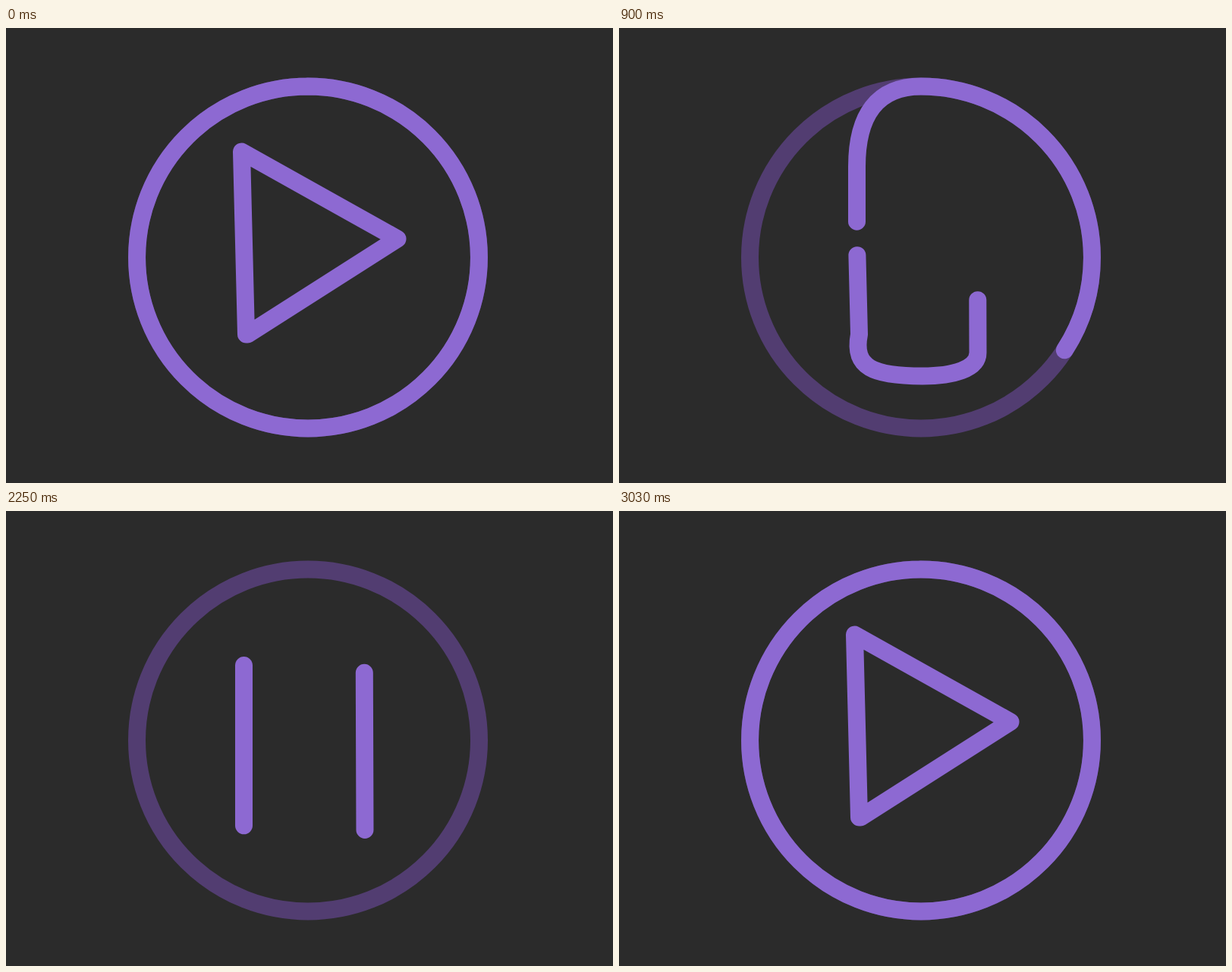
Write an HTML page that moves like this. It is 800 px wide and 600 px high and loops after 3390 ms.

```html
<!DOCTYPE html>
<html lang="en">
<head>
<meta charset="utf-8">
<title>Play / pause</title>
<style>
  html, body { margin: 0; width: 100%; height: 100%; overflow: hidden; background: #2b2b2b; }
  svg { display: block; width: 800px; height: 600px; }
  svg * { fill: none; stroke-width: 23; stroke-linecap: round; stroke-linejoin: round; }
  circle { stroke: #523d71; }
  path { stroke: #8d69d2; }
</style>
</head>
<body>
<svg viewBox="0 0 800 600">
  <circle cx="398" cy="302.5" r="225.5"/>
  <path id="ring"/>
  <path id="triangle"/>
</svg>
<script>
const LOOP = 3390, STEP = 30, TO_PAUSE = 442, TO_PLAY = 2212;

// Each stroke slides from its play outline along a tail and ends as a pause bar.
function makeStroke(id, outline, tail, bar, duration) {
  const path = document.getElementById(id);
  path.setAttribute('d', outline);
  const closed = path.getTotalLength();
  path.setAttribute('d', outline + tail);
  return { path, closed, total: path.getTotalLength(), bar, duration };
}

const strokes = [
  makeStroke('ring',
    'M398 77a225.5 225.5 0 0 0 0 451a225.5 225.5 0 0 0 0-451',
    'C340 77 313.5 115 313.5 183V416', 205, 828),
  makeStroke('triangle',
    'M318.5 404L516 278L310.5 163L316.5 404',
    'C308 448 335 459 400 459C440 459 473 450 473 428L472.3 211', 204, 766)
];

function ease(u) {
  u = Math.min(1, Math.max(0, u));
  return (1 - Math.cos(Math.PI * u)) / 2;
}

function draw(now) {
  const t = Math.floor(now % LOOP / STEP) * STEP;
  for (const { path, closed, total, bar, duration } of strokes) {
    const p = ease((t - TO_PAUSE) / duration) - ease((t - TO_PLAY) / duration);
    const start = p * (total - bar);
    const end = closed + p * (total - closed);
    path.style.strokeDasharray = `${end - start} ${2 * total}`;
    path.style.strokeDashoffset = -start;
  }
}

let origin;
function tick(now) {
  origin ??= now;
  draw(now - origin);
  requestAnimationFrame(tick);
}
draw(0);
requestAnimationFrame(tick);
</script>
</body>
</html>
```
